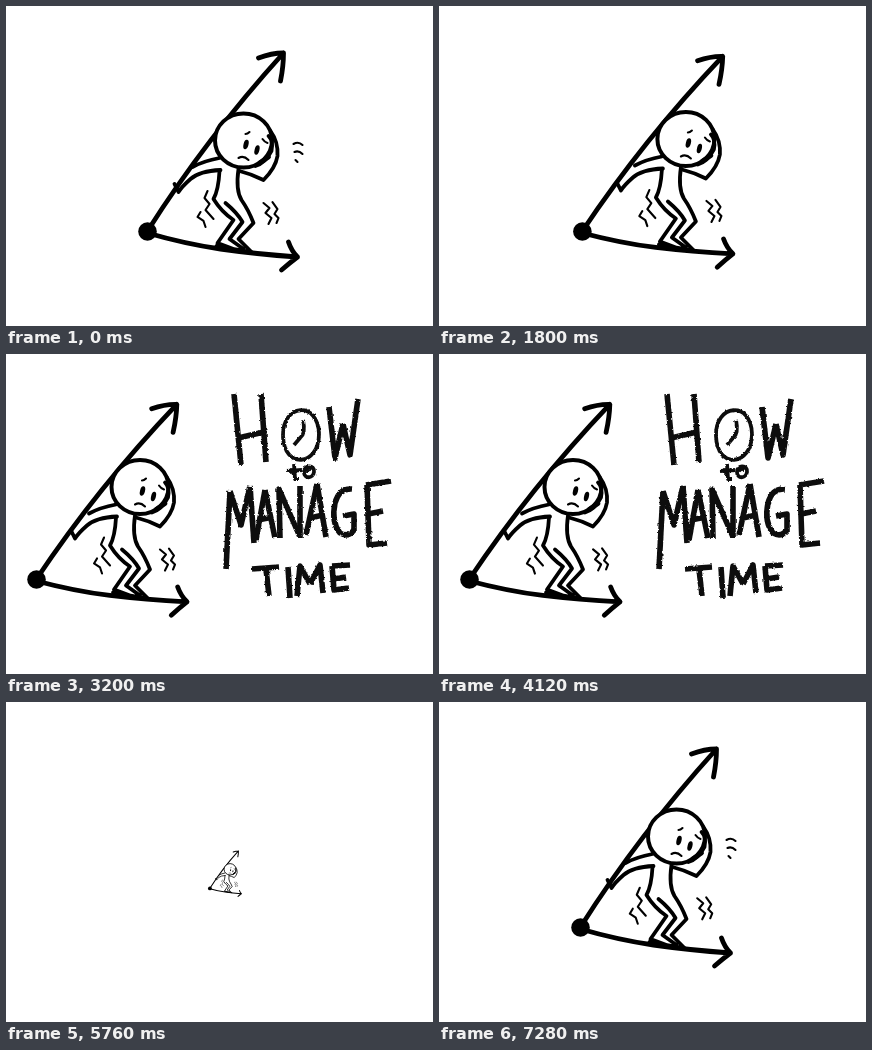
Recreate the animation shown at these times as an HTML page. Size 427 by 320 pixels, loop 7320 ms.

```html
<!DOCTYPE html>
<html lang="en">
<head>
<meta charset="utf-8">
<title>How to manage time</title>
<style>
  html, body { margin: 0; width: 100%; height: 100%; overflow: hidden; background: #fff; }
  svg { display: block; width: 100%; height: 100%; }
  path { fill: none; stroke: #000; stroke-width: 3.8; stroke-linecap: round; stroke-linejoin: round; }
  .thick { stroke-width: 4.8; }
  .thin { stroke-width: 2.1; }
  #words path { stroke: #111; stroke-width: 5.6; stroke-linecap: butt; }
  #words .fine { stroke-width: 3.8; }
</style>
</head>
<body>
<svg viewBox="0 0 427 320" role="img" aria-label="How to manage time">
  <defs>
    <filter id="chalk" filterUnits="userSpaceOnUse" x="200" y="20" width="210" height="250">
      <feTurbulence id="grain" type="fractalNoise" baseFrequency="0.35" numOctaves="2"/>
      <feDisplacementMap in="SourceGraphic" scale="2.6" xChannelSelector="R" yChannelSelector="G"/>
    </filter>
  </defs>
  <g id="scene">
    <g id="figure">
      <g id="upper">
        <path class="thick" d="M142 225Q201 132 278 47M253 52Q266 47 278 47Q278 60 275 75"/>
      </g>
      <g id="lower">
        <path class="thick" d="M142 227Q180 238 215 243T292 251M283 236Q286 245 292 251Q284 257 276 264"/>
      </g>
      <circle cx="142" cy="225.5" r="9.3"/>
      <g id="body">
        <path d="M214 152Q198 155 187 161M215 164Q194 165 185 173Q176 181 173 186L169 178"/>
        <path d="M214 165Q213 184 208 193Q216 206 228 214L212 237L228 243M220 197Q232 207 237 216L224 233L238 243M233 163Q230 184 236 194Q243 204 248 217L233 233L246 246M211 240L246 246"/>
        <path d="M234 165Q246 168 258 174Q270 162 272 150Q273 136 265 125"/>
        <ellipse cx="238" cy="134.5" rx="28.5" ry="27" fill="#fff" stroke="#000" stroke-width="4"/>
        <path d="M250 160Q260 157 266 145Q268 135 263 130"/>
        <path d="M254 157L263 151" class="thick"/>
        <ellipse cx="240.5" cy="138.5" rx="2.5" ry="4.8" transform="rotate(14 240.5 138.5)"/>
        <ellipse cx="251.5" cy="144" rx="2.4" ry="4.8" transform="rotate(14 251.5 144)"/>
        <path class="thin" d="M240 128Q242 128 244 126M257 133Q259 136 262 137M233 152Q238 149 243 154"/>
        <path id="shakeLeft" class="thin" d="M202 185L199 192L204 198L200 204L208 213M195 206L192 211L198 215L200 221"/>
        <path id="shakeRight" class="thin" d="M258 197L264 202L260 207L266 212L263 218M267 196L272 203L269 208L273 212L271 217"/>
        <path id="sweat" class="thin" d="M288 138Q293 135 297 139M289 146Q293 144 297 148M290 154L292 156"/>
      </g>
    </g>
    <g id="words" filter="url(#chalk)"></g>
  </g>
</svg>
<script>
const LOOP = 7320;
const $ = id => document.getElementById(id);

// Strokes of the lettering: the first set is written before the second.
const early = [
  "M228 40L235 111", "M255 40L260 108", "M337 70L344 101L352 45",
  "M284 117L290 117", "M299 117Q302 112 306 115",
  "M244 132L248 189", "M252 166L267 163", "M259 136L269 184",
  "M294 132L294 184", "M304 164L317 161", "M311 130L320 183",
  "M337 162L348 160L348 178", "M362 160L377 157", "M361 131L363 191L381 189",
  "M246 215L273 213", "M260 215L263 242", "M282 213L284 244",
  "M304 230L314 211L317 239", "M327 225L340 223", "M326 212L328 236L343 234"
];
const late = [
  "M232 84L258 78", "M323 53L329 104L337 70",
  "M224 137L220 215", "M224 137L235 171L244 132", "M259 136L250 186",
  "M274 184L273 135L294 183", "M311 130L300 181",
  "M346 135Q333 134 329 149Q325 168 334 179Q342 184 348 176",
  "M385 127L360 131", "M291 242L294 212L304 230", "M344 211L326 212"
];
const earlyFine = ["M277 82C276 50 312 46 313 80C313 112 278 116 277 82", "M297 66Q300 80 294 84L288 91"];
const lateFine = ["M288 110L289 125L293 125", "M281 117L296 116", "M298 118C298 110 309 111 308 118S298 125 298 118"];

function makeStrokes(list, start, duration, className) {
  return list.map(d => {
    const path = document.createElementNS("http://www.w3.org/2000/svg", "path");
    path.setAttribute("d", d);
    path.setAttribute("pathLength", 1);
    path.setAttribute("class", className);
    $("words").append(path);
    return { path, start, duration };
  });
}
const strokes = [
  ...makeStrokes(early, 2180, 640, "bold"), ...makeStrokes(earlyFine, 2180, 700, "fine"),
  ...makeStrokes(late, 2560, 480, "bold"), ...makeStrokes(lateFine, 2560, 480, "fine")
];

const clamp = x => Math.max(0, Math.min(1, x));
const smooth = x => x * x * (3 - 2 * x);

// Eased value between [time, value] keys.
function track(keys, t) {
  if (t <= keys[0][0]) return keys[0][1];
  for (let i = 1; i < keys.length; i++) {
    const [t0, a] = keys[i - 1], [t1, b] = keys[i];
    if (t < t1) return a + (b - a) * smooth((t - t0) / (t1 - t0));
  }
  return keys[keys.length - 1][1];
}

function popScale(t) {
  if (t >= 5720 && t < 6340) return 1.13 * (1 - (1 - (t - 5720) / 620) ** 3);
  if (t >= 6340) return track([[6340, 1.13], [6690, 0.985], [7040, 1]], t);
  return track([[0, 1], [350, 1.018], [760, 1]], t);
}

function draw(t) {
  const entering = t >= 5720;
  const squeeze = entering ? 0 : smooth(clamp((t - 760) / 740));
  const slide = entering ? 0 : track([[1560, 0], [1840, 2], [2560, -115], [2900, -111]], t);
  const scale = popScale(t);

  $("scene").setAttribute("opacity", entering ? 1 : 1 - smooth(clamp((t - 4720) / 580)));
  $("figure").setAttribute("transform",
    `translate(${220.5 + slide} 176) scale(${scale}) translate(-221 -176)`);
  const blur = entering ? 0.7 * clamp(1 - (t - 5760) / 200) : 0;
  $("scene").style.filter = blur ? `blur(${blur}px)` : "none";

  $("upper").setAttribute("transform", `rotate(${1.4 * squeeze} 142 225)`);
  $("lower").setAttribute("transform", `rotate(${-1.2 * squeeze} 142 225)`);
  $("body").setAttribute("transform", `translate(${7.5 * squeeze} ${-1.5 * squeeze})`);

  const shake = Math.sin(t / LOOP * Math.PI * 2 * 24);
  $("shakeLeft").setAttribute("transform", `translate(${shake} ${-shake})`);
  $("shakeRight").setAttribute("transform", `translate(${-shake} ${shake})`);
  $("sweat").style.visibility = t >= 7280 || t < 760 ? "visible" : "hidden";

  $("words").style.display = t > 2180 && !entering ? "" : "none";
  $("grain").setAttribute("seed", 1 + Math.floor(t / 120) % 3);
  for (const { path, start, duration } of strokes) {
    const p = smooth(clamp((t - start) / duration));
    path.style.visibility = p > 0 ? "visible" : "hidden";
    path.style.strokeDasharray = p < 1 ? `${p} 2` : "none";
    path.style.strokeDashoffset = -(1 - p) / 2;
  }
}

const begin = performance.now();
function tick() {
  draw((performance.now() - begin) % LOOP);
  requestAnimationFrame(tick);
}
tick();
</script>
</body>
</html>
```
